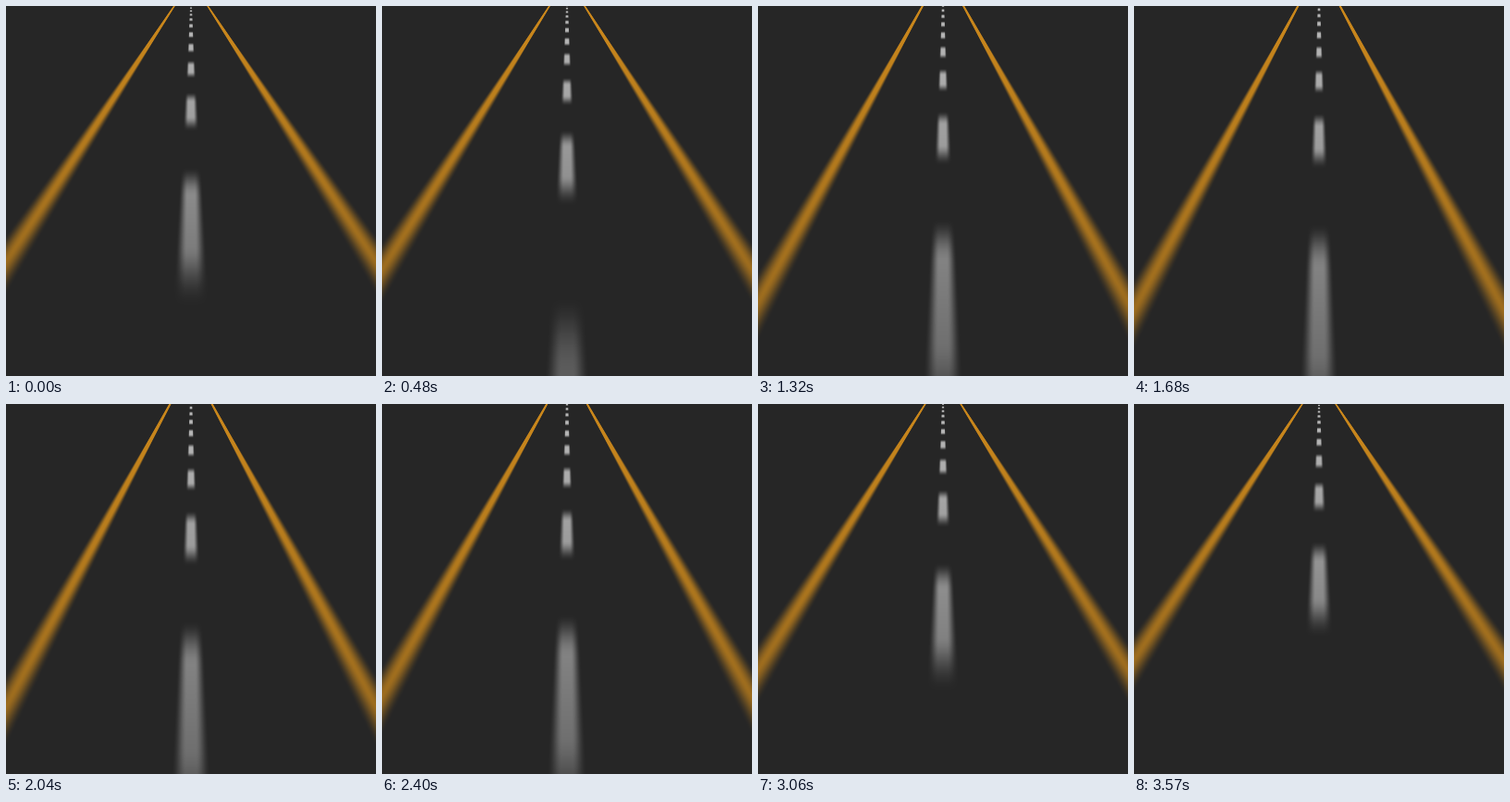
Animation, 400 px wide and 400 px high, one loop 3600 ms. Source, as an HTML page with a canvas:

```html
<!DOCTYPE html>
<html>
<head>
<meta charset="utf-8">
<title>Road</title>
<style>
  html, body { margin: 0; width: 100%; height: 100%; overflow: hidden; background: #262626; }
  canvas { display: block; width: 400px; height: 400px; }
</style>
</head>
<body>
<canvas id="road" width="400" height="400"></canvas>
<script>
const SIZE = 400, STEP = 30, STEPS = 120;
const PIVOT_Y = 39;      // screen row the view tilts around
const LINE_X = 43.75;    // side line offset, in road units
const LINE_HALF = 2.3, DASH_HALF = 2.4;
const SPACING = 0.2205;  // distance between dashes, in units of pivot depth
const DASHES = 35;       // dashes passed per loop
const GROUND = [38, 38, 38], YELLOW = [224, 148, 26], WHITE = [230, 230, 230];

const ctx = document.getElementById("road").getContext("2d");
const image = ctx.createImageData(SIZE, SIZE);
const px = image.data;

const clamp = v => Math.min(1, Math.max(0, v));

// 1 inside `half`, falling to 0 across a soft edge of +-`blur`
function soft(distance, half, blur) {
  const v = clamp((distance - half + blur) / (2 * blur));
  return 1 - v * v * (3 - 2 * v);
}

// Distance in dashes: slow at first, easing up to a steady cruise
function accelerate(n) {
  const x = clamp((n - 10.5) / 24);
  const slow = n - 24 * (x ** 3 - x ** 4 / 2) - Math.max(0, n - 34.5);
  return n / 3 - slow / 9;
}

function travel(n) {
  return n <= STEPS / 2 ? accelerate(n) : DASHES - accelerate(STEPS - n);
}

function paint(x, y, color, alpha) {
  const i = (y * SIZE + x) * 4;
  for (let c = 0; c < 3; c++) px[i + c] += (color[c] - px[i + c]) * alpha;
}

// One row of a blurred stripe; `half` and `blur` are in road units
function paintStripe(y, center, scale, half, blur, color, alpha) {
  const reach = (half + blur) * scale;
  const from = Math.max(0, Math.floor(center - reach));
  const to = Math.min(SIZE - 1, Math.ceil(center + reach));
  for (let x = from; x <= to; x++) {
    const distance = Math.abs(x + 0.5 - center) / scale;
    paint(x, y, color, alpha * soft(distance, half, blur));
  }
}

function draw(n) {
  const tilt = (1 - Math.cos(2 * Math.PI * n / STEPS)) / 2;
  const horizon = -27.5 - 14.8 * tilt;
  const height = PIVOT_Y - horizon;
  const moved = travel(n) - 0.172;

  for (let i = 0; i < px.length; i += 4) {
    px[i] = GROUND[0];
    px[i + 1] = GROUND[1];
    px[i + 2] = GROUND[2];
    px[i + 3] = 255;
  }

  for (let y = 0; y < SIZE; y++) {
    const drop = y + 0.5 - horizon;
    const scale = drop / height;
    const pixel = 0.5 / scale;

    const lineBlur = Math.max(0.1, 3 - 3 / scale) + pixel;
    for (const side of [-1, 1]) {
      paintStripe(y, SIZE / 2 + side * LINE_X * scale, scale, LINE_HALF, lineBlur,
        YELLOW, 0.92 - 0.062 * scale);
    }

    const phase = 1 / (scale * SPACING) + moved;
    const off = Math.abs(phase - Math.round(phase));
    const rowPhase = height / (SPACING * drop * drop);
    const dashAlpha = (0.82 - 0.085 * scale) * soft(off, 0.22, 0.1 + 0.4 * rowPhase);
    if (dashAlpha > 0) {
      const dashBlur = Math.max(0.1, 1.6 - 1.2 / scale) + pixel;
      paintStripe(y, SIZE / 2, scale, DASH_HALF, dashBlur, WHITE, dashAlpha);
    }
  }
  ctx.putImageData(image, 0, 0);
}

let shown = -1;
const start = performance.now();
function tick() {
  const n = Math.floor((performance.now() - start) / STEP) % STEPS;
  if (n !== shown) draw(shown = n);
  requestAnimationFrame(tick);
}
tick();
</script>
</body>
</html>
```
